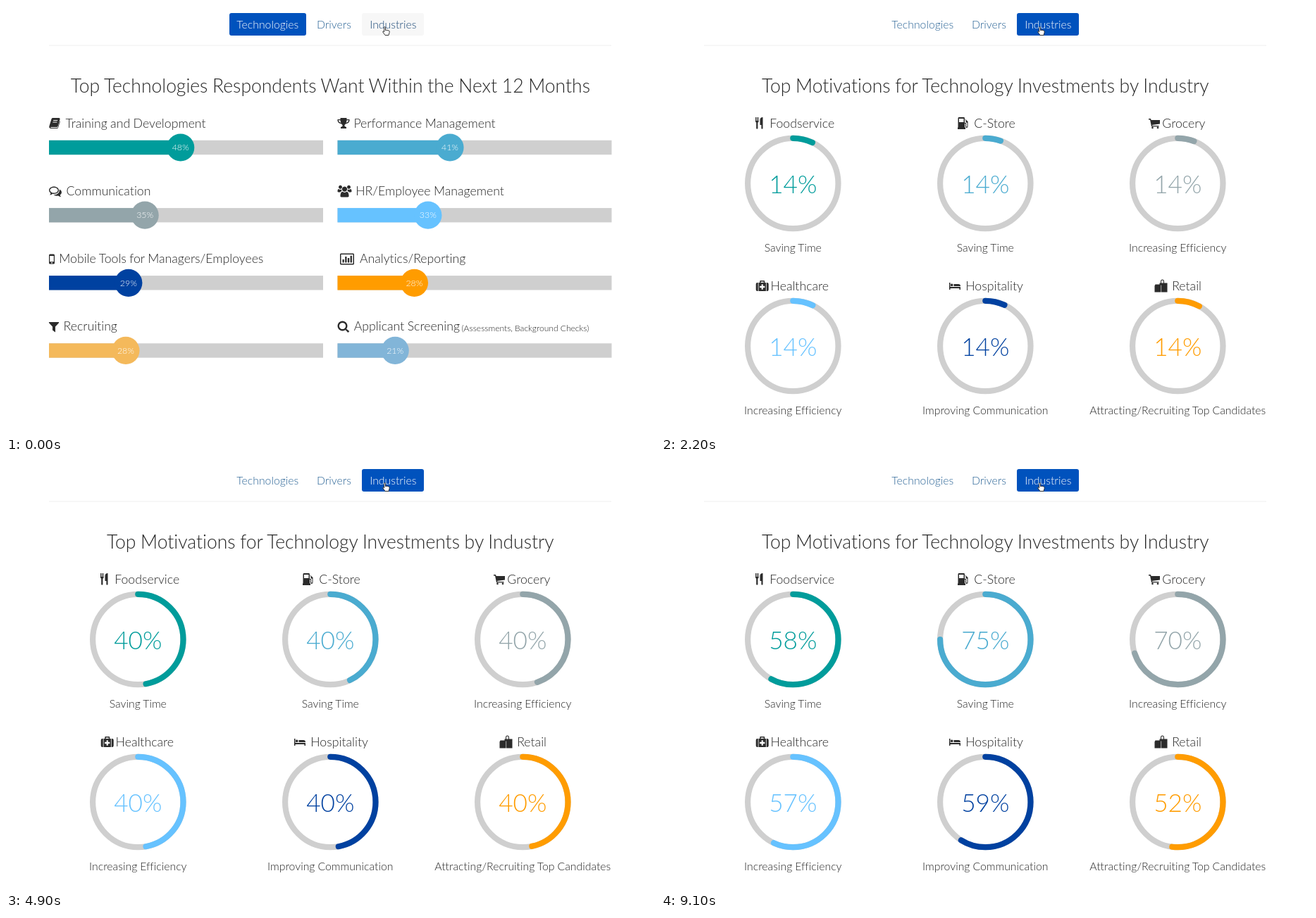
These frames come from a looping animation (921 px wide and 608 px high, 9.2 s). An HTML page:

```html
<!DOCTYPE html>
<html lang="en">
<head>
<meta charset="utf-8">
<title>Survey results</title>
<style>
  html, body { margin: 0; height: 100%; overflow: hidden; background: #fff; }
  svg { display: block; width: 100vw; height: 100vh; }
  text {
    font: 300 17.7px Lato, sans-serif; font-variant-ligatures: none;
    word-spacing: -.02em; fill: #262626;
  }
  .mid { text-anchor: middle; }
  .title { font-size: 26.5px; }
  .tab, .caption { font-size: 15.8px; }
  .note { font-size: 12.1px; }
  .value { font-size: 12.4px; fill: #fff; }
  .count { font-size: 35.2px; }
  .icon { fill: #2b2b2b; fill-rule: evenodd; }
  .ring { fill: none; stroke-width: 8.2; stroke-linecap: round; }
</style>
</head>
<body>
<svg viewBox="0 0 921 608">
  <path d="M61 56H859" stroke="#eee"/>
  <g id="tabs"></g>
  <g id="bars"></g>
  <g id="rings"></g>
  <path id="hand" transform="translate(534.5 29.5)" fill="#fff" stroke="#222" stroke-width=".9"
    d="M3 0Q4 0 4 1.2V5Q6 4.3 9 5.5Q10 6 9.6 8L8.5 12H3.5L.3 7.5Q0 6.3 1.3 6.3L2.2 7.2V1.2Q2.2 0 3 0Z"/>
</svg>
<script>
const LOOP = 9200, STEP = 100;
const CLICK = 280, FADE = 150, COUNT_START = 710, MS_PER_POINT = 104;

const icons = {
  book: 'M5 0H14.5Q16 .5 15.5 2L12.5 12Q12 13 11 13H3Q2 13 2.3 14H12.3L15 5L16 4.5 13 14Q12.6 15 11.5 15H2.5Q0 14.5 .3 12L3.5 1.5Q4 0 5 0ZM6.3 3l-.3 1h6l.3-1ZM5.6 5.5l-.3 1h6l.3-1Z',
  trophy: 'M4 0H13V2H17V4Q16.5 7.5 11.5 8.5Q9.8 9.8 9.8 11Q10 12.3 12.5 13V15H4.5V13Q7 12.3 7.2 11Q7.2 9.8 5.5 8.5Q.5 7.5 0 4V2H4ZM1.3 3.3Q1.5 6 4.9 7Q4 5.5 4 3.3ZM13 3.3Q13 5.5 12.1 7Q15.5 6 15.7 3.3Z',
  chat: 'M7 0C11 0 14 2.3 14 5.2S11 10.4 7 10.4Q6 10.4 5.2 10.2Q3.4 11.6 1 12Q2.3 10.8 2.4 9.2Q0 7.7 0 5.2C0 2.3 3 0 7 0ZM7 1.4C4 1.4 1.4 3 1.4 5.2Q1.4 7.2 4.2 8.4V9L5 8.8C9.5 9.6 12.6 7.7 12.6 5.2C12.6 3 10 1.4 7 1.4ZM15 4Q18 5.5 18 8Q18 10.5 15.7 11.8Q15.8 13.4 17.2 14.8Q14.5 14.2 13 13Q9 13.6 6.5 11.8Q15 12 15 4Z',
  people: 'M10 2a3.6 3.6 0 1 0 .01 0ZM4 .3a2.5 2.5 0 1 0 .01 0ZM16 .3a2.5 2.5 0 1 0 .01 0ZM4 16Q4 9.3 7 9.3Q10 11.5 13 9.3Q16 9.3 16 16Q16 17 14 17H6Q4 17 4 16ZM0 9Q0 5.5 1.5 5.5Q3.5 7 5.8 6Q5.5 8 6 8.5Q4.5 8.7 3.8 10H1.5Q0 10 0 9ZM20 9Q20 5.5 18.5 5.5Q16.5 7 14.2 6Q14.5 8 14 8.5Q15.5 8.7 16.2 10H18.5Q20 10 20 9Z',
  phone: 'M1.5 0H6.5Q8 0 8 1.5V12.5Q8 14 6.5 14H1.5Q0 14 0 12.5V1.5Q0 0 1.5 0ZM1.2 2.4V10.8H6.8V2.4ZM4 11.5a.8.8 0 1 0 .01 0Z',
  chart: 'M1 0H19L20 1V15L19 16H1L0 15V1ZM1.5 1.5V14.5H18.5V1.5ZM3.5 8.5H5.8V13H3.5ZM7.2 4.5H9.5V13H7.2ZM10.9 6.5H13.2V13H10.9ZM14.6 3.2H16.9V13H14.6Z',
  funnel: 'M0 0H14Q14.5 .8 13.7 1.5L9 6.5V14.5L5 11.5V6.5L.3 1.5Q-.4 .8 0 0Z',
  search: 'M7 0a7 7 0 1 0 .01 0ZM7 2.4a4.6 4.6 0 1 1-.01 0ZM11.2 12.6L12.6 11.2 16.8 14.6 14.8 16.6Z',
  cutlery: 'M0 0H1V5H1.8V0H2.8V5H3.6V0H4.6V6Q4.6 7 3.4 7.5V16Q2.3 17.5 1.2 16V7.5Q0 7 0 6ZM10.5 0V16Q9.4 17.5 8.4 16V11H6.5V4Q6.5 0 10.5 0Z',
  pump: 'M1.5 0H9Q10 0 10 1.5V14.5H11V17H0V14.5H.5V1.5Q.5 0 1.5 0ZM2 2V7H8.5V2ZM11 3L14.5 6V13Q14.5 15 12.8 15Q11 15 11 13V9H10V8H12V13Q12.8 14.5 13.5 13V8L11.5 7V4.5L10.5 3.5Z',
  cart: 'M0 0H3L3.6 2H16V7.5L5 9L5.3 10H14.5V11.3H4L2 1.5H0ZM5.5 11.5a1.4 1.4 0 1 0 .01 0ZM13 11.5a1.4 1.4 0 1 0 .01 0Z',
  medkit: 'M5.5 3V1Q5.5 0 6.5 0H11.5Q12.5 0 12.5 1V3H16Q18 3 18 5V13Q18 15 16 15H2Q0 15 0 13V5Q0 3 2 3ZM7 1.4V3H11V1.4ZM8 5.2V7.8H5.4V10.2H8V12.8H10V10.2H12.6V7.8H10V5.2ZM3 3V15H3.8V3ZM14.2 3V15H15V3Z',
  bed: 'M0 0H1.5V6H16V10H14.5V8H1.5V10H0ZM3.7 1.5a1.8 1.8 0 1 0 .01 0ZM6.5 2H13Q16 2 16 5H6.5Z',
  bags: 'M0 9L1 7H7V5H18V18H0ZM8.5 5V3Q8.5 0 11 0T13.5 3V5H12.5V3Q12.5 1 11 1T9.5 3V5ZM9 8V18H9.6V8Z'
};

const $ = id => document.getElementById(id);
const text = (x, y, cls, s, fill = '') =>
  `<text x="${x}" y="${y}" class="${cls}"${fill && ` style="fill:${fill}"`}>${s}</text>`;
const icon = (name, x, y) =>
  `<path class="icon" transform="translate(${x} ${y})" d="${icons[name]}"/>`;

// label, centre, left, width
const tabs = [['Technologies', 371.3, 317, 109], ['Drivers', 465.5, 430, 71], ['Industries', 549.3, 505, 88]];
$('tabs').innerHTML = tabs.map(([s, mid, x, w]) =>
  `<rect x="${x}" y="10" width="${w}" height="32" rx="3"/>` + text(mid, 32, 'tab mid', s)).join('');

// label, text x, icon, icon x offset, icon y, percent, colour
const bars = [
  ['Training and Development', 84.6, 'book', 0, 159, 48, '#009c9b'],
  ['Performance Management', 493.4, 'trophy', 0, 159, 41, '#4aabd0'],
  ['Communication', 85.5, 'chat', 0, 256.5, 35, '#93a5aa'],
  ['HR/Employee Management', 496.2, 'people', 0, 254.5, 33, '#66c2ff'],
  ['Mobile Tools for Managers/Employees', 75.3, 'phone', 0, 352.5, 29, '#0041a0'],
  ['Analytics/Reporting', 502, 'chart', 3.5, 351.5, 28, '#ff9c00'],
  ['Recruiting', 81.5, 'funnel', 0, 449, 28, '#f4b95b'],
  ['Applicant Screening', 493.8, 'search', 0, 447.5, 21, '#82b5d8']
];
$('bars').innerHTML =
  text(460.3, 123, 'title mid', 'Top Technologies Respondents Want Within the Next 12 Months') +
  bars.map(([label, tx, name, dx, iy, pct, color], i) => {
    const x = i % 2 ? 470.5 : 61, y = 201 + 96.15 * (i >> 1), w = 389 * pct / 100;
    return icon(name, x + dx, iy) + text(tx, y - 28, '', label) +
      `<rect x="${x}" y="${y - 10.2}" width="389" height="20.4" fill="#cfcfcf"/>
       <g fill="${color}"><rect x="${x}" y="${y - 10.2}" width="${w}" height="20.4"/>
       <circle cx="${x + w}" cy="${y}" r="19.6"/></g>` +
      text(x + w, y + 4.3, 'value mid', pct + '%');
  }).join('') +
  text(646.5, 461.5, 'note', '(Assessments, Background Checks)');

// label, text x, icon, icon x, icon y, caption, percent, colour
const rings = [
  ['Foodservice', 154.2, 'cutlery', 134, 158, 'Saving Time', 58, '#009c9b'],
  ['C-Store', 444.3, 'pump', 421, 158, 'Saving Time', 75, '#4aabd0'],
  ['Grocery', 711.3, 'cart', 692, 160, 'Increasing Efficiency', 70, '#93a5aa'],
  ['Healthcare', 155.6, 'medkit', 134.7, 390, 'Increasing Efficiency', 57, '#66c2ff'],
  ['Hospitality', 432.3, 'bed', 409, 393, 'Improving Communication', 59, '#0041a0'],
  ['Retail', 725.2, 'bags', 700.5, 388.5, 'Attracting/Recruiting Top Candidates', 52, '#ff9c00']
];
$('rings').innerHTML =
  text(460.3, 123, 'title mid', 'Top Motivations for Technology Investments by Industry') +
  rings.map(([label, tx, name, ix, iy, caption, , color], i) => {
    const x = 187.3 + 273 * (i % 3), y = 252 + (i > 2 ? 231 : 0);
    return icon(name, ix, iy) + text(tx, y - 79, '', label) +
      `<circle class="ring" cx="${x}" cy="${y}" r="64.2" stroke="#cfcfcf"/>
       <circle class="ring arc" cx="${x}" cy="${y}" r="64.2" stroke="${color}"
         pathLength="100" transform="rotate(-90 ${x} ${y})"/>` +
      text(x, y + 14, 'count mid', '0%', color) +
      text(x, y + 97, 'caption mid', caption);
  }).join('');

const tabRects = document.querySelectorAll('#tabs rect');
const tabTexts = document.querySelectorAll('#tabs text');
const arcs = document.querySelectorAll('.arc');
const counts = document.querySelectorAll('.count');
const clamp = v => Math.max(0, Math.min(1, v));
const easeInOut = u => u < .5 ? 2 * u * u : 1 - 2 * (1 - u) ** 2;

function draw(t) {
  const active = t < CLICK ? 0 : 2, hovered = 2;
  tabs.forEach((_, i) => {
    tabRects[i].style.fill = i === active ? '#0052bd' : i === hovered ? '#f7f7f7' : 'none';
    tabTexts[i].style.fill = i === active ? '#fff' : i === hovered ? '#1d4a78' : '#2a6496';
  });

  $('bars').style.opacity = clamp(1 - (t - CLICK) / FADE);
  $('rings').style.opacity = clamp((t - CLICK - FADE) / FADE);

  rings.forEach((ring, i) => {
    const pct = ring[6], u = clamp((t - COUNT_START) / (pct * MS_PER_POINT));
    arcs[i].style.visibility = u > 0 ? 'inherit' : 'hidden';
    arcs[i].style.strokeDasharray = `${pct * easeInOut(u)} 200`;
    counts[i].textContent = Math.round(pct * u) + '%';
  });
}

const start = performance.now();
function tick() {
  const t = (performance.now() - start) % LOOP;
  draw(Math.floor(t / STEP) * STEP);
  requestAnimationFrame(tick);
}
tick();
</script>
</body>
</html>
```
